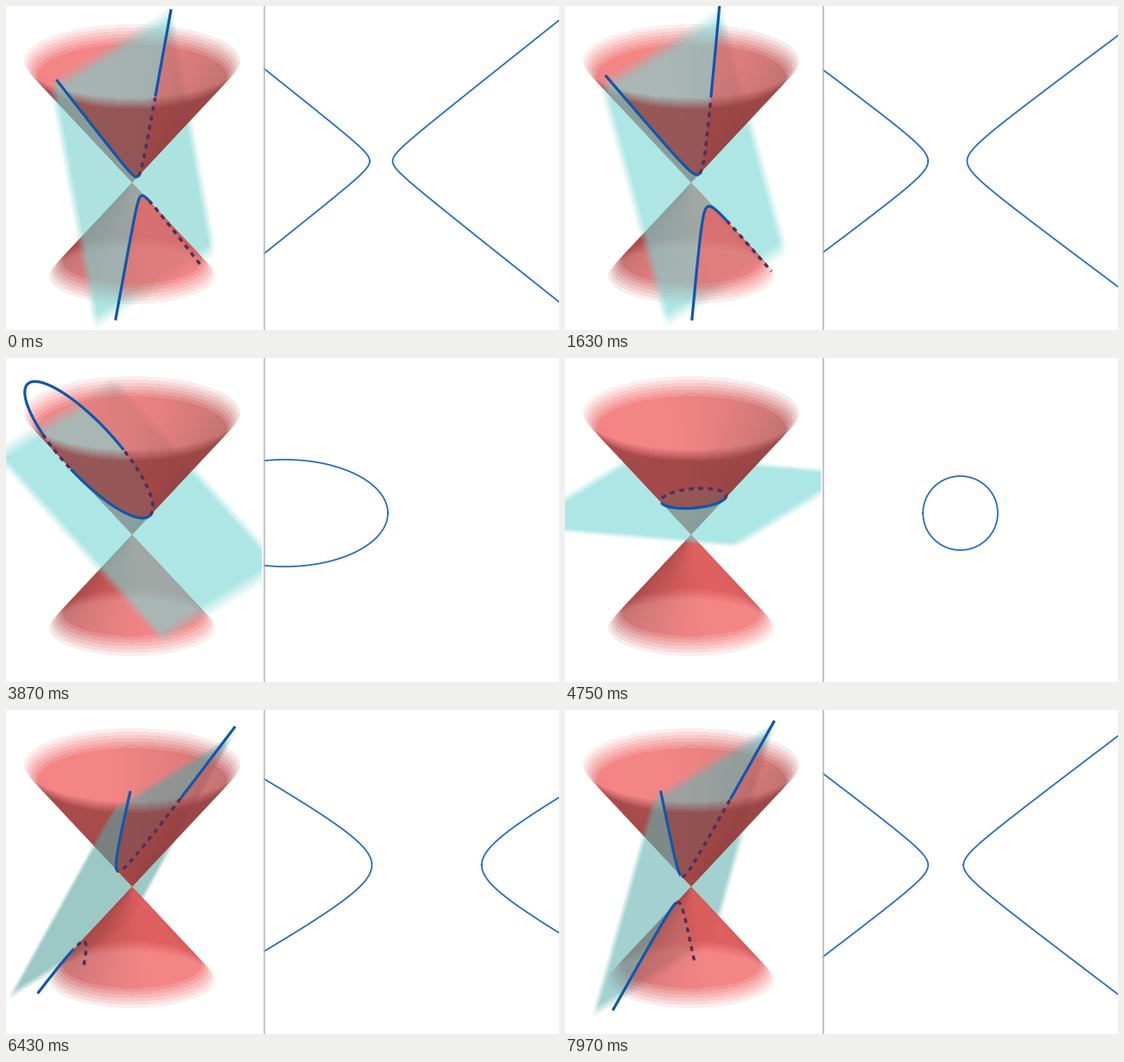
Animation, 640 px wide and 376 px high, one loop 8 s. Source, as a matplotlib script:

```python
import numpy as np
import matplotlib.pyplot as plt
from matplotlib.animation import FuncAnimation

W, H = 640, 376
SPLIT = 296
FRAMES, STEP = 160, 50

K = 0.836                                   # cone radius / height
APEX = (146, 205)
TOP, BOTTOM = 150, 115                      # cone extent above / below apex
CURVE_TOP, CURVE_BOTTOM = 170, -131
D3 = 45.0                                   # height where plane meets the axis
KD2 = 42.8                                  # circle radius in the flat view
SE, CE = np.sin(np.radians(20)), np.cos(np.radians(20))
PHI = np.radians(-29)
UX, UY = np.cos(PHI), np.sin(PHI)
LIGHT = np.array([0.35, -0.35, 0.87])
RED = np.array([240, 93, 93]) / 255
TEAL = np.array([120, 215, 212]) / 255
QUAD = CE**2 - K**2 * SE**2
LAM_SUM = 2 * SE * CE * (1 + K**2) / QUAD

jj, ii = np.meshgrid(np.arange(SPLIT), np.arange(H))
X = (jj + 0.5 - APEX[0]).astype(np.float32)
Y = (APEX[1] - ii - 0.5).astype(np.float32)
psi = np.linspace(0, 2 * np.pi, 4001)


def bands(f, n):
    return np.ceil(np.clip(f, 0, 1) * n) / n


def cone_wall(lam, cover):
    """Colour and opacity of one cone hit along every view ray."""
    y, z = SE * Y - CE * lam, CE * Y + SE * lam
    r = np.hypot(X, y) + 1e-6
    h = 1 / np.hypot(1, K)
    n = np.stack([h * X / r, h * y / r, -K * h * np.sign(z)], -1)
    facing = np.sign(n @ np.array([0, -CE, SE]))
    lit = np.clip((n @ LIGHT) * facing / 0.9, 0, 1)
    shade = 0.6 + 0.4 * lit
    alpha = 0.75 * cover * bands(np.minimum(TOP - z, BOTTOM + z) / 22, 7)
    return (shade[..., None] * RED).astype(np.float32), alpha.astype(np.float32)


slope = K / np.sqrt(QUAD)
cover = np.clip((slope * np.abs(Y) - np.abs(X)) * 0.73 + 0.5, 0, 1)
half = np.sqrt(np.maximum(slope**2 * Y**2 - X**2, 0) / QUAD)
lam_near, lam_far = LAM_SUM * Y / 2 + half, LAM_SUM * Y / 2 - half
near_rgb, near_a = cone_wall(lam_near, cover)
far_rgb, far_a = cone_wall(lam_far, cover)


def over(img, rgb, a):
    return img + (rgb - img) * a[..., None]


def plane_layer(m):
    """Depth, colour and opacity of the plane z = D3 + m * v."""
    root = np.hypot(1, m)
    den = SE + m * UY * CE
    if abs(den) < 1e-3:
        den = 1e-3
    lam = (D3 - CE * Y + m * (UX * X + UY * SE * Y)) / den
    y = SE * Y - CE * lam
    s = (UX * X + UY * y) * root + 25 * m / root
    t = UX * y - UY * X + 7
    edge = bands((151 - np.abs(s)) / 18, 7) * bands((148 - np.abs(t)) / 18, 7)
    n = np.array([-m * UX, -m * UY, 1]) / root
    n = n * np.sign(n @ np.array([0, -CE, SE]))
    shade = 0.76 + 0.24 * np.clip(1.4 * (n @ LIGHT), 0, 1)
    return lam, (TEAL * shade).astype(np.float32), (0.6 * edge).astype(np.float32)


def render(m):
    lam, rgb, a = plane_layer(m)
    back, front = lam < lam_far, lam >= lam_near
    img = np.ones((H, SPLIT, 3), np.float32)
    img = over(img, rgb, a * back)
    img = over(img, far_rgb, far_a)
    img = over(img, rgb, a * ~(back | front))
    img = over(img, near_rgb, near_a)
    img = over(img, rgb, a * front)
    return np.clip(img, 0, 1)


def polar(kd, m):
    den = 1 - K * m * np.cos(psi)
    return kd / np.where(np.abs(den) < 1e-6, 1e-6, den)


def section_3d(m):
    r = polar(K * D3, m)
    x, y, z = r * np.cos(psi + PHI), r * np.sin(psi + PHI), r / K
    up = CE * z + SE * y
    lam = SE * z - CE * y
    other = LAM_SUM * up - lam
    z_other = CE * up + SE * other
    hidden = (other > lam) & (z_other > -BOTTOM) & (z_other < TOP)
    if abs(K * m) > 1:
        shown = (z < CURVE_TOP) & (z > CURVE_BOTTOM)
    else:
        shown = z < 900
    px, py = APEX[0] + x, APEX[1] - up
    return px, np.where(shown & ~hidden, py, np.nan), np.where(shown & hidden, py, np.nan)


def section_2d(m):
    r = polar(KD2, m)
    root = np.hypot(1, m)
    px = 470 - 93 * abs(m) / root - np.sign(m) * r * np.cos(psi) * root
    py = 180 - r * np.sin(psi)
    return px, np.where(np.abs(r) < 900, py, np.nan)


fig = plt.figure(figsize=(W / 100, H / 100), dpi=100, facecolor="white")


def panel(x0, x1):
    ax = fig.add_axes([x0 / W, 0, (x1 - x0) / W, 1])
    ax.axis("off")
    return ax


def frame_panel(ax, x0, x1):
    ax.set_aspect("auto")
    ax.set_xlim(x0, x1)
    ax.set_ylim(H, 0)


left, right = panel(0, SPLIT), panel(298, W)
scene = left.imshow(np.ones((H, SPLIT, 3)), extent=(0, SPLIT, H, 0),
                    interpolation="nearest", zorder=0)
dashed, = left.plot([], [], color="#502f5c", lw=2.5, ls=(0, (1.6, 1.6)),
                    dash_capstyle="butt", zorder=2)
solid, = left.plot([], [], color="#1057ab", lw=2.3, solid_capstyle="butt", zorder=3)
flat, = right.plot([], [], color="#1f69c6", lw=1.25)
right.plot([299, 299], [0, H], color="#b4b4b4", lw=1.1)
frame_panel(left, 0, SPLIT)
frame_panel(right, 298, W)


def draw(i):
    m = -4.986 + 1.07 * i * STEP / 1000
    scene.set_data(render(m))
    x, vis, hid = section_3d(m)
    solid.set_data(x, vis)
    dashed.set_data(x, hid)
    flat.set_data(*section_2d(m))
    return scene, dashed, solid, flat


anim = FuncAnimation(fig, draw, frames=FRAMES, interval=STEP,
                     init_func=lambda: draw(0), repeat=True, repeat_delay=0, blit=False)
plt.show()
```
